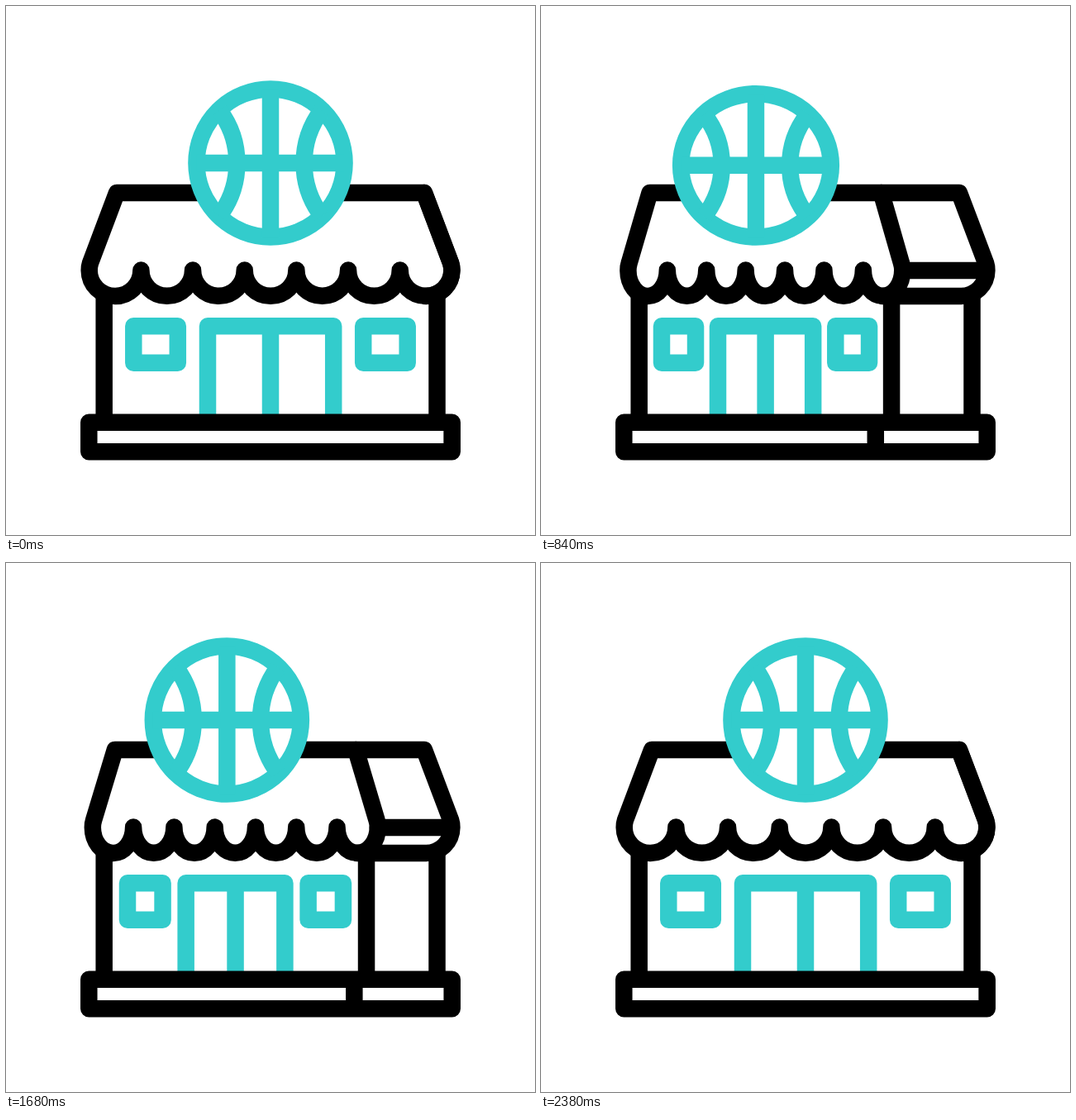
An HTML page for the animation above (2.4 s loop, 640x640 px).

```html
<!DOCTYPE html>
<html lang="en">
<head>
<meta charset="utf-8">
<title>Sports shop</title>
<style>
  html, body { margin: 0; width: 100%; height: 100%; overflow: hidden; background: #fff; }
  svg { display: block; width: 100%; height: 100%; }
  path { fill: none; stroke: #000; stroke-width: 20.5; stroke-linecap: round; stroke-linejoin: round; }
  .teal { stroke: #3cc; }
  .flat { stroke-linecap: butt; }
  #ring { fill: #fff; }
</style>
</head>
<body>
<svg viewBox="0 0 640 640">
  <path id="windows" class="teal"/>
  <path id="door" class="teal flat"/>
  <path id="walls"/>
  <path id="side"/>
  <path id="awning"/>
  <path id="base"/>
  <path id="ring" class="teal"/>
  <path id="seams" class="teal flat"/>
</svg>
<script>
const LOOP = 2400, TURN = 1200, BACK_END = 2390;

// Ball poses: centre y, outer radius x, outer radius y
const REST = [190, 99.8, 99.8];
const SQUASH = [209, 108.4, 81];
const PEAK = [116, 80.3, 99];
const BOUNCE = [
  [0, REST], [320, SQUASH], [640, PEAK],
  [790, REST], [994, SQUASH], [1314, PEAK], [1604, REST]
];

const mix = (a, b, k) => a + (b - a) * k;
const smooth = s => s * s * (3 - 2 * s);
const draw = (id, d) => document.getElementById(id).setAttribute('d', d);

// cubic-bezier(.8, 0, .2, 1)
function ease(x) {
  let lo = 0, hi = 1;
  for (let i = 0; i < 24; i++) {
    const s = (lo + hi) / 2, r = 1 - s;
    if (2.4 * r * r * s + 0.6 * r * s * s + s * s * s < x) lo = s; else hi = s;
  }
  return smooth(lo);
}

function turnAt(t) {
  if (t < TURN) return ease(t / TURN);
  return 1 - ease(Math.min(1, (t - TURN) / (BACK_END - TURN)));
}

function ballAt(t) {
  const i = BOUNCE.findIndex(([time]) => time > t);
  if (i < 0) return REST;
  const [t0, a] = BOUNCE[i - 1], [t1, b] = BOUNCE[i];
  const k = smooth((t - t0) / (t1 - t0));
  return a.map((v, j) => mix(v, b[j], k));
}

const box = (x0, x1, y0, y1) => `M${x0} ${y0}H${x1}V${y1}H${x0}Z`;

function drawShop(p) {
  const at = (a, b) => mix(a, b, p);

  draw('windows',
    box(at(154.3, 145.3), at(207.8, 185.3), 387.3, 431.8) +
    box(at(432.2, 350), at(485.7, 389.7), 387.3, 431.8));
  draw('door',
    `M${at(244, 211.5)} 500V387.3H${at(396.2, 323.6)}V500M${at(320, 267.6)} 387.3V500`);
  draw('walls', `M118.7 352V503M521.5 352V503M${at(521.5, 416)} 352V503`);
  draw('base',
    box(100.3, 539.7, 503.7, 539.3) + `M${at(539.6, 393.6)} 503.7V539.3`);

  const left = at(100.7, 105.8), right = at(539.4, 428.8);
  const topLeft = at(134, 131.3), topRight = at(506, 403.8);
  const w = (right - left) / 7;
  let d = `M${topRight} 226H${topLeft}L${left + 1.3} 311Q${left} 315 ${left} 320`;
  for (let i = 1; i <= 7; i++) d += `A${w / 2} 31.2 0 0 0 ${left + i * w} 319.6`;
  draw('awning', d + `Q${right} 315 ${right - 1.3} 311Z`);

  draw('side',
    `M${topRight} 226H506L538.1 311Q539.4 315 539.4 320` +
    `A31.3 31.2 0 0 1 508 351H${right - w / 2}M${right} 320H539.4`);
}

function drawBall(cx, [cy, rx, ry]) {
  const a = rx - 10.25, b = ry - 10.25;
  const sx = a / 89.6, sy = b / 89.6;
  const X = x => cx + x * sx, Y = y => cy + y * sy;
  const seam = (x, sweep) =>
    `M${X(x)} ${Y(-64)}A${106.5 * sx} ${106.5 * sy} 0 0 ${sweep} ${X(x)} ${Y(64)}`;

  draw('ring', `M${cx - a} ${cy}A${a} ${b} 0 0 1 ${cx + a} ${cy}A${a} ${b} 0 0 1 ${cx - a} ${cy}Z`);
  draw('seams',
    `M${cx} ${cy - b}V${cy + b}M${cx - a} ${cy}H${cx + a}` + seam(-62, 1) + seam(62, 0));
}

function render(now) {
  const t = now % LOOP, p = turnAt(t);
  drawShop(p);
  drawBall(320 - 65 * p, ballAt(t));
}

let start;
function tick(now) {
  start ??= now;
  render(Math.max(0, now - start));
  requestAnimationFrame(tick);
}
render(0);
requestAnimationFrame(tick);
</script>
</body>
</html>
```
